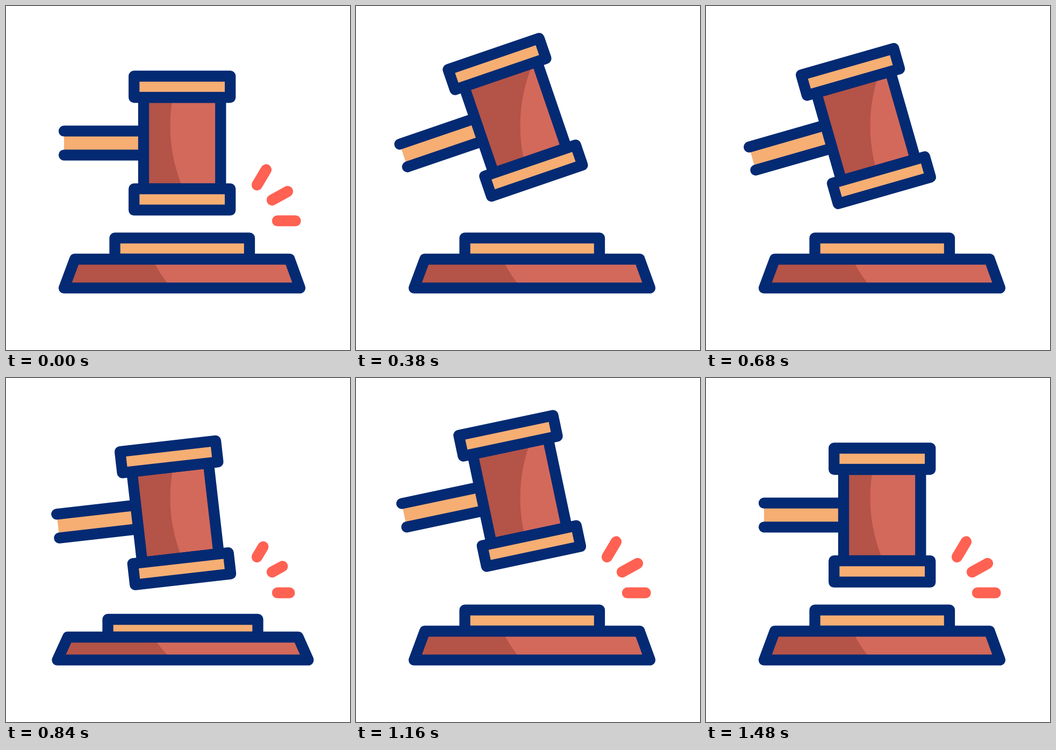
These frames come from a looping animation (640x640 px, 1640 ms). An HTML page with a canvas:

```html
<!DOCTYPE html>
<html lang="en">
<head>
<meta charset="utf-8">
<title>Gavel</title>
<style>
  html, body { margin: 0; width: 100%; height: 100%; overflow: hidden; background: #fff; }
  canvas { display: block; width: 100vw; height: 100vh; }
</style>
</head>
<body>
<canvas id="stage" width="640" height="640"></canvas>
<script>
const LOOP = 1640, STEP = 20;
const NAVY = '#032a73', SAND = '#f6ae73', DARK = '#b45347', LIGHT = '#d3695b', CORAL = '#ff6152';
const PIVOT = [327.5, 361];

// time, shift x, shift y, tilt in degrees
const GAVEL = [
  [110, 0, 0, 0],
  [380, 3, -53.7, 18.9],
  [556, -2, -104, 32],
  [680, -1, -35.8, 16],
  [804, 0, 30, 0],
  [920, -2, -82.8, 20.9],
  [1480, 0, 0, 0]
];
// time, amount
const SQUASH = [[804, 0], [840, 1], [1004, 0]];
const RAYS = [[110, 1], [190, 0], [804, 0], [858, 1]];

// start point and full extent of each ray
const RAY_LINES = [[467, 333, 17, -28.5], [495, 361, 29, -16], [505, 399.7, 33.5, 0]];

const ctx = document.getElementById('stage').getContext('2d');

function sample(track, t) {
  if (t <= track[0][0]) return track[0].slice(1);
  for (let i = 1; i < track.length; i++) {
    const a = track[i - 1], b = track[i];
    if (t < b[0]) {
      const k = (t - a[0]) / (b[0] - a[0]);
      return a.slice(1).map((v, j) => v + (b[j + 1] - v) * k);
    }
  }
  return track[track.length - 1].slice(1);
}

function poly(points, closed = true) {
  const path = new Path2D();
  points.forEach(([x, y]) => path.lineTo(x, y));
  if (closed) path.closePath();
  return path;
}

function box(x0, y0, x1, y1) {
  return poly([[x0, y0], [x1, y0], [x1, y1], [x0, y1]]);
}

function paint(path, fill, stroke = NAVY) {
  if (fill) {
    ctx.fillStyle = fill;
    ctx.fill(path);
  }
  if (stroke) {
    ctx.strokeStyle = stroke;
    ctx.stroke(path);
  }
}

// Fill a shape in two tones; the shadow stays fixed on the stage.
function shaded(shape, shadow) {
  ctx.save();
  paint(shape, LIGHT, null);
  ctx.clip(shape);
  ctx.setTransform(1, 0, 0, 1, 0, 0);
  ctx.fillStyle = DARK;
  ctx.fill(shadow, 'evenodd');
  ctx.restore();
  paint(shape);
}

function drawBase(k) {
  const mix = (a, b) => a + (b - a) * k;
  const top = mix(471, 482);
  paint(box(mix(202.5, 189.5), mix(431.7, 449), mix(453, 468.5), top), SAND);

  const slab = poly([
    [mix(128, 115), top], [mix(527.5, 543.5), top],
    [mix(547, 562.5), 524.7], [mix(108, 95.5), 524.7]
  ]);
  const shadow = new Path2D();
  const edge = top + 10.5;
  shadow.moveTo(60, 540);
  shadow.lineTo(60, 460);
  shadow.lineTo(mix(271, 273), 460);
  shadow.lineTo(mix(278, 281), edge);
  shadow.quadraticCurveTo(mix(287.5, 289.5), (edge + 517) / 2, 300, 515);
  shadow.lineTo(316, 540);
  shadow.closePath();
  shaded(slab, shadow);
}

function drawGavel([dx, dy, tilt]) {
  const [px, py] = PIVOT;
  ctx.save();
  ctx.translate(px + dx, py + dy);
  ctx.rotate(-tilt * Math.PI / 180);
  ctx.translate(-px, -py);

  paint(box(108, 232.7, 256, 277.3), SAND, null);
  for (const y of [232.7, 277.3]) paint(poly([[108, y], [256, y]], false));

  const shadow = new Path2D();
  shadow.rect(0, 0, 640, 640);
  shadow.arc(603, 223, 297.5, 0, Math.PI * 2);
  shaded(box(256, 170, 399.3, 340), shadow);

  for (const y of [130.5, 340.2]) paint(box(238.2, y, 417.2, y + 39.5), SAND);
  ctx.restore();
}

function drawRays(k) {
  if (k <= 0) return;
  for (const [x, y, w, h] of RAY_LINES) {
    paint(poly([[x, y], [x + w * k, y + h * k]], false), null, CORAL);
  }
}

function draw(t) {
  ctx.fillStyle = '#fff';
  ctx.fillRect(0, 0, 640, 640);
  ctx.lineWidth = 20.3;
  ctx.lineCap = ctx.lineJoin = 'round';
  drawBase(sample(SQUASH, t)[0]);
  drawRays(sample(RAYS, t)[0]);
  drawGavel(sample(GAVEL, t));
}

const start = performance.now();
function tick() {
  const t = (performance.now() - start) % LOOP;
  draw(Math.floor(t / STEP) * STEP);
  requestAnimationFrame(tick);
}
tick();
</script>
</body>
</html>
```
